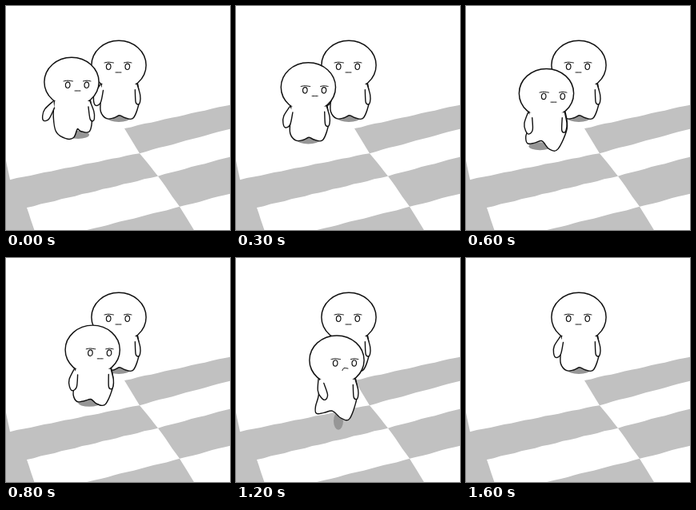
These frames come from a looping animation (280 by 280 pixels, 2300 ms). An HTML page with a canvas:

```html
<!DOCTYPE html>
<html lang="en">
<head>
<meta charset="utf-8">
<title>Walk and sink</title>
<style>
html, body { margin: 0; width: 100%; height: 100%; overflow: hidden; background: #fff; }
canvas { display: block; width: 280px; height: 280px; }
</style>
</head>
<body>
<canvas id="stage"></canvas>
<script>
const SIZE = 280, LOOP = 2300, STEP = 100;
const STEP_OFF = 10, FALL = 12, GONE = 16, HOLE_Y = 232;
const INK = '#111', FLOOR = '#c1c1c1', SHADE = '#969696';

const canvas = document.getElementById('stage');
const ctx = canvas.getContext('2d');
const ratio = window.devicePixelRatio || 1;
canvas.width = canvas.height = SIZE * ratio;
ctx.scale(ratio, ratio);
ctx.lineCap = ctx.lineJoin = 'round';

const clamp = v => Math.max(0, Math.min(1, v));
const mix = (a, b, k) => a + (b - a) * k;

// Smooth open curve through the points.
function curve(points) {
  const path = new Path2D(), last = points.length - 1;
  path.moveTo(...points[0]);
  for (let i = 0; i < last; i++) {
    const a = points[Math.max(0, i - 1)], b = points[i];
    const c = points[i + 1], d = points[Math.min(last, i + 2)];
    path.bezierCurveTo(b[0] + (c[0] - a[0]) / 6, b[1] + (c[1] - a[1]) / 6,
      c[0] - (d[0] - b[0]) / 6, c[1] - (d[1] - b[1]) / 6, ...c);
  }
  return path;
}

function oval(x, y, rx, ry) {
  const path = new Path2D();
  path.ellipse(x, y, rx, ry, 0, 0, Math.PI * 2);
  return path;
}

function stroke(path, width, color = INK) {
  ctx.lineWidth = width;
  ctx.strokeStyle = color;
  ctx.stroke(path);
}

function fill(path, color) {
  ctx.fillStyle = color;
  ctx.fill(path);
}

function at(x, y, draw, turn = 0) {
  ctx.save();
  ctx.translate(x, y);
  ctx.rotate(turn);
  draw();
  ctx.restore();
}

// swing: stride from -1 to 1, drop: stepping over the edge, raise: arms thrown out.
const still = { x: 141, y: 74, face: -1, swing: 0, drop: 0, raise: 0 };

function walker(step) {
  const walk = Math.min(step, FALL), fall = Math.max(0, step - FALL);
  const raise = clamp(fall / 2);
  return {
    x: 82 + 2.5 * walk + .097 * walk ** 2 + 5 * fall,
    y: 95 + 2 * walk + .06 * walk ** 2 + 10 * fall ** 2,
    face: 7 + walk / 4 - 5 * raise,
    swing: step < 9 ? Math.cos(Math.PI * step / 6) : 0,
    drop: clamp((step - STEP_OFF) / (FALL - STEP_OFF)),
    raise
  };
}

// All parts are placed relative to the middle of the head.
function bodyShape({ swing, drop, raise }) {
  const lx = -12 + 8 * swing - 10 * drop, ly = 67 + 4 * swing + 14 * raise;
  const rx = 14 + 4 * swing - 2 * drop, ry = 66 - 4 * swing + 7 * drop + 8 * raise;
  return curve([
    [-21, 24], [-22, 44], [lx * .4 - 17, ly - 9], [lx - 3, ly - 1], [lx + 6, ly - 2],
    [(lx + rx) / 2, Math.min(ly, ry) - 4],
    [rx - 6, ry - 1], [rx + 4, ry - 1], [25 - 4 * raise, 44], [23, 24]
  ]);
}

function armShape(side, degrees, length, r) {
  const a = degrees * Math.PI / 180, sin = Math.sin(a), cos = Math.cos(a);
  const point = (along, out) =>
    [side * (23 + along * sin + out * cos), 24 + along * cos - out * sin];
  return curve([
    point(0, 0), point(length * .6, r), point(length, r * .8),
    point(length + r, 0), point(length, -r), point(length * .3, -r)
  ]);
}

function drawFace({ drop, raise }) {
  for (const side of [-1, 1]) {
    stroke(oval(side * 11.8, .8, 2.8, 3.7), 1.2);
    stroke(curve([[side * 6.5 + 1, -4], [side * 12, -4.8], [side * 17, -4]]), 1);
  }
  const frown = drop + raise / 2;
  stroke(curve([[-3, 8 + 2 * frown], [-1, 8 - frown], [4, 8 - frown / 2]]), 1);
}

function drawFigure(pose) {
  const { x, y, face, swing, drop, raise } = pose;
  at(x, y, () => {
    const head = oval(0, 0, 33.4 - raise, 30), body = bodyShape(pose);
    const length = mix(22, 15, raise);
    const left = armShape(-1, mix(12 + 14 * swing - 30 * drop, 78, raise), length, 5);
    const right = armShape(1, mix(3 + 5 * swing, 98, raise), length, 3 + 3 * raise);

    if (raise) at(-8, 10, () => [body, left].forEach(shape => fill(shape, SHADE)));
    else fill(oval(8 * swing + 2 * drop, 66 + 10 * drop, 14 - 8 * drop, 5 + 6 * drop), SHADE);

    for (const shape of [head, body]) stroke(shape, 2.9);
    for (const shape of [head, body]) fill(shape, '#fff');
    for (const arm of [left, right]) {
      fill(arm, '#fff');
      stroke(arm, 1.4);
    }
    at(face, mix(face < 0 ? 1 : 3, -10, raise), () => drawFace(pose), -.1 * raise);
  });
}

// Floor patch with a slightly uneven brush edge.
function patch(...points) {
  const path = new Path2D();
  points.forEach(([x, y], i) => {
    const [nx, ny] = points[(i + 1) % points.length];
    const parts = Math.ceil(Math.hypot(nx - x, ny - y) / 9);
    for (let j = 0; j < parts; j++) {
      const px = mix(x, nx, j / parts);
      path.lineTo(px, mix(y, ny, j / parts) + .3 * Math.sin(px * 1.7));
    }
  });
  path.closePath();
  fill(path, FLOOR);
}

// The diagonal seam where the dark and white tiles meet.
const seam = [[148, 153], [167, 184], [190, 212.5], [217, 251], [236, 282]];

function drawFloor() {
  patch(seam[0], [282, 123], [282, 153], seam[1]);
  patch([5, 217], seam[1], seam[2], [26, 252], [36, 282], [-2, 282], [-2, 184]);
  patch(seam[2], [282, 188], [282, 234], seam[3]);
  patch([94, 282], seam[3], seam[4]);
}

function draw(step) {
  ctx.fillStyle = '#fff';
  ctx.fillRect(0, 0, SIZE, SIZE);
  drawFloor();
  drawFigure(still);
  if (step >= GONE) return;
  ctx.save();
  if (step > FALL) {
    ctx.beginPath();
    ctx.rect(0, 0, SIZE, HOLE_Y);
    ctx.clip();
  }
  drawFigure(walker(step));
  ctx.restore();
}

const begin = performance.now();
let shown = -1;
function tick() {
  const step = Math.min(GONE, Math.floor((performance.now() - begin) % LOOP / STEP));
  if (step !== shown) draw(shown = step);
  requestAnimationFrame(tick);
}
tick();
</script>
</body>
</html>
```
